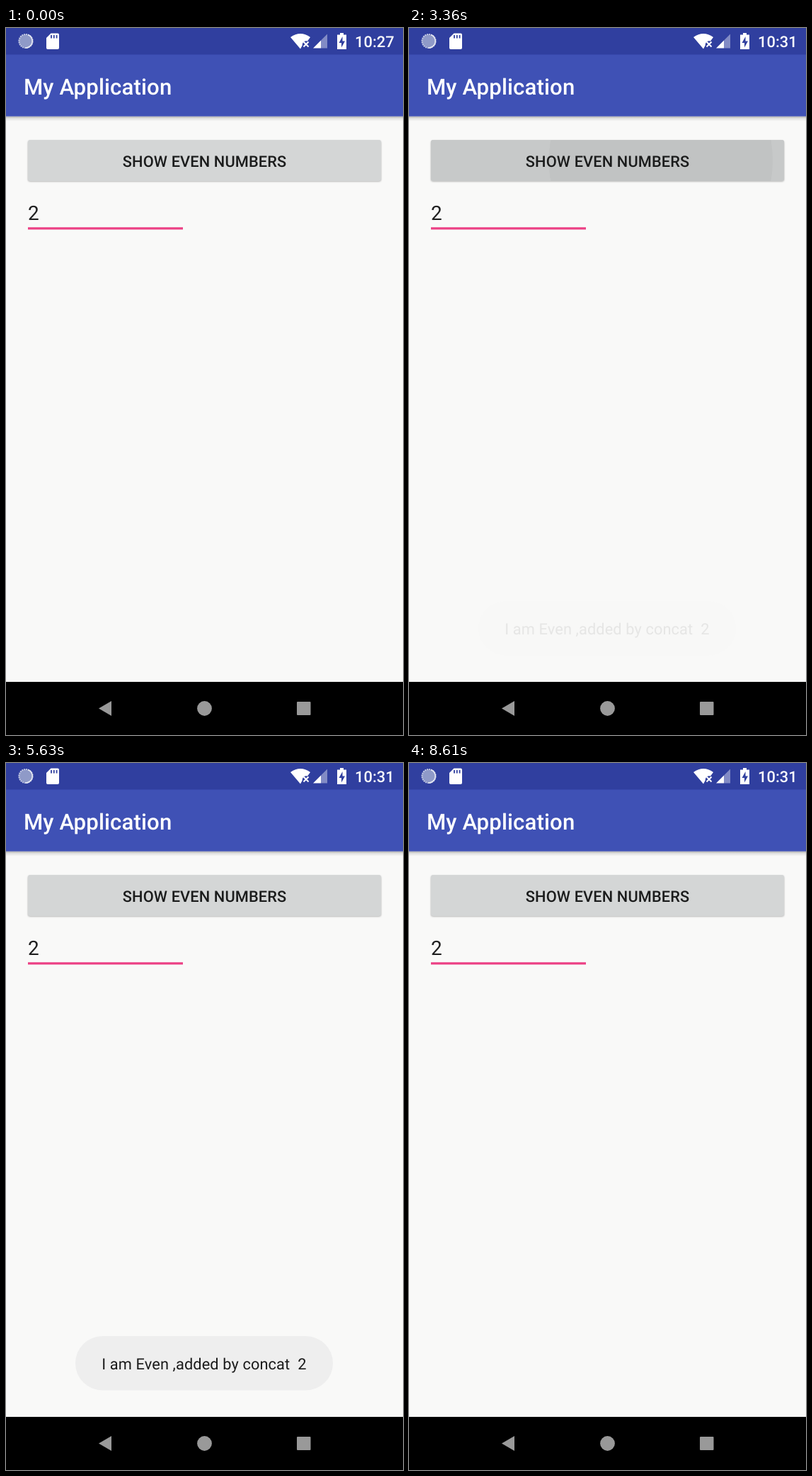
These frames come from a looping animation (561x998 px, 8.9 s). An HTML page:

```html
<!DOCTYPE html>
<html lang="en">
<head>
<meta charset="utf-8">
<title>Even numbers</title>
<style>
  html, body { margin: 0; width: 100%; height: 100%; overflow: hidden; background: #f9f9f8; }
  svg { display: block; width: 561px; height: 998px; }
  text {
    font-family: Roboto, sans-serif;
    letter-spacing: .1px;
    text-rendering: geometricPrecision;
    white-space: pre;
  }
  .medium { font-weight: 500; }
  .small { font-size: 21.8px; }

  .old, .new, .cursor, .toast, .lift, .press, .ripple { animation: 8.9s linear infinite; }
  .old { animation-name: old; animation-timing-function: step-end; }
  .new { animation-name: new; animation-timing-function: step-end; }
  .cursor { animation-name: blink; animation-timing-function: step-end; }
  .toast { animation-name: toast; }
  .lift { animation-name: lift; }
  .press { animation-name: press; }
  .ripple { animation-name: ripple; }

  @keyframes old { 0% { opacity: 1 } .674%, 100% { opacity: 0 } }
  @keyframes new { 0% { opacity: 0 } .674%, 100% { opacity: 1 } }

  @keyframes blink {
    0%, 6.966%, 18.202%, 29.438%, 52.134%, 63.258%, 74.494%, 80.112%, 96.741%, 100% { opacity: 0 }
    1.348%, 12.584%, 23.82%, 40.674%, 57.191%, 68.876%, 75.842%, 91.123% { opacity: 1 }
  }

  @keyframes toast {
    0% { opacity: 0 }
    37.528% { opacity: 0; animation-timing-function: cubic-bezier(.333, .667, .667, 1) }
    43.146% { opacity: 1 }
    75.73% { opacity: 1; animation-timing-function: cubic-bezier(.333, 0, .667, .333) }
    81.348%, 100% { opacity: 0 }
  }

  @keyframes lift {
    0%, 34.494% { opacity: 0 }
    35.4%, 36.3% { opacity: 1 }
    37.4%, 100% { opacity: 0 }
  }

  @keyframes press {
    0%, 34.494% { opacity: 0 }
    35.9%, 37.753% { opacity: 1 }
    42.9%, 100% { opacity: 0 }
  }

  @keyframes ripple {
    0%, 34.494% { opacity: 0; transform: translate(400px, 187px) scale(.3) }
    35.2% { opacity: 1 }
    37.753% { opacity: 1; transform: translate(356px, 187px) scale(1.58) }
    41.6%, 100% { opacity: 0; transform: translate(281px, 187px) scale(2.7) }
  }
</style>
</head>
<body>
<svg viewBox="0 0 561 998">
  <defs>
    <linearGradient id="shade" x2="0" y2="1">
      <stop offset="0" stop-opacity=".3"/>
      <stop offset=".4" stop-opacity=".1"/>
      <stop offset="1" stop-opacity="0"/>
    </linearGradient>
    <clipPath id="face"><rect x="31" y="158" width="499" height="58" rx="3"/></clipPath>
    <filter id="soft" x="-5%" y="-30%" width="110%" height="160%"><feGaussianBlur stdDeviation="2.2"/></filter>
    <filter id="edge" x="-5%" y="-30%" width="110%" height="160%"><feGaussianBlur stdDeviation=".8"/></filter>
  </defs>

  <rect width="561" height="998" fill="#f9f9f8"/>

  <!-- App bar -->
  <rect y="124.700" width="561" height="7" fill="url(#shade)"/>
  <rect width="561" height="124.700" fill="#3f51b5"/>
  <rect width="561" height="37.500" fill="#303f9f"/>
  <text class="medium" x="24.900" y="93.500" font-size="31.2" fill="#fff">My Application</text>

  <!-- Status bar -->
  <circle cx="28" cy="18.500" r="9.600" fill="#8f9ac8" stroke="#c5cbe4" stroke-width="2" stroke-dasharray="2 1"/>
  <path d="M31 9.500a9.600 9.600 0 0 1-3 18.600" fill="none" stroke="#e4e7f2" stroke-width="1.600"/>
  <g fill="#fff">
    <path d="M63.500 7.500H73q2 0 2 2V28q0 2-2 2H59q-2 0-2-2V14z"/>
    <path d="M402 13Q416 3 430 13L426 18.500Q419 17 418.500 25L416 29.500z"/>
    <path d="M434 28.500 445 17.500V28.500z"/>
    <path d="M445 17.500 454 8.500V28.500H445z" opacity=".4"/>
    <path d="M472 7h5v2.500h4V30H468V9.500h4z"/>
  </g>
  <path d="M64 10v4.500M67.800 10v4.500M71.600 10v4.500" stroke="#303f9f" stroke-width="1.800"/>
  <path d="M420.500 19.500l7 7m0-7l-7 7" stroke="#fff" stroke-width="2"/>
  <path d="M475.500 12 470.500 21H474V27.500L479 18.500H475.500z" fill="#303f9f"/>
  <g class="medium small" fill="#fff">
    <text class="old" x="493" y="27.300">10:27</text>
    <text class="new" x="493" y="27.300">10:31</text>
  </g>

  <!-- Button -->
  <rect class="lift" x="30" y="160" width="501" height="59" rx="4" fill-opacity=".25" filter="url(#soft)"/>
  <rect x="31" y="159.300" width="499" height="57.500" rx="3" fill-opacity=".3" filter="url(#edge)"/>
  <g clip-path="url(#face)">
    <rect x="31" y="158" width="499" height="58" fill="#d4d6d6"/>
    <rect class="press" x="31" y="158" width="499" height="58" fill="#c7c9c9"/>
    <circle class="ripple" r="100" fill-opacity=".032"/>
  </g>
  <text class="medium small" x="280.500" y="195.700" text-anchor="middle" fill="#1b1c1c">SHOW EVEN NUMBERS</text>

  <!-- Number field -->
  <text x="31" y="270.700" font-size="28" fill="#202020">2</text>
  <rect x="31" y="281.300" width="219" height="3.200" fill="#ec3f84"/>
  <rect class="cursor" x="46" y="240" width="3" height="38.500" fill="#e04f7f"/>

  <!-- Toast -->
  <g class="toast">
    <rect x="98" y="809" width="364" height="76.500" rx="38.200" fill="#eee"/>
    <text class="small" x="280" y="856" text-anchor="middle" fill="#1c1c1c" xml:space="preserve">I am Even ,added by concat  2</text>
  </g>

  <!-- Navigation bar -->
  <rect y="923" width="561" height="75" fill="#000"/>
  <g fill="#999">
    <path d="M131 960.500 149 950V971z"/>
    <circle cx="280.500" cy="960.500" r="10.400"/>
    <rect x="411" y="951" width="19.500" height="19" rx="1"/>
  </g>
</svg>
</body>
</html>
```
